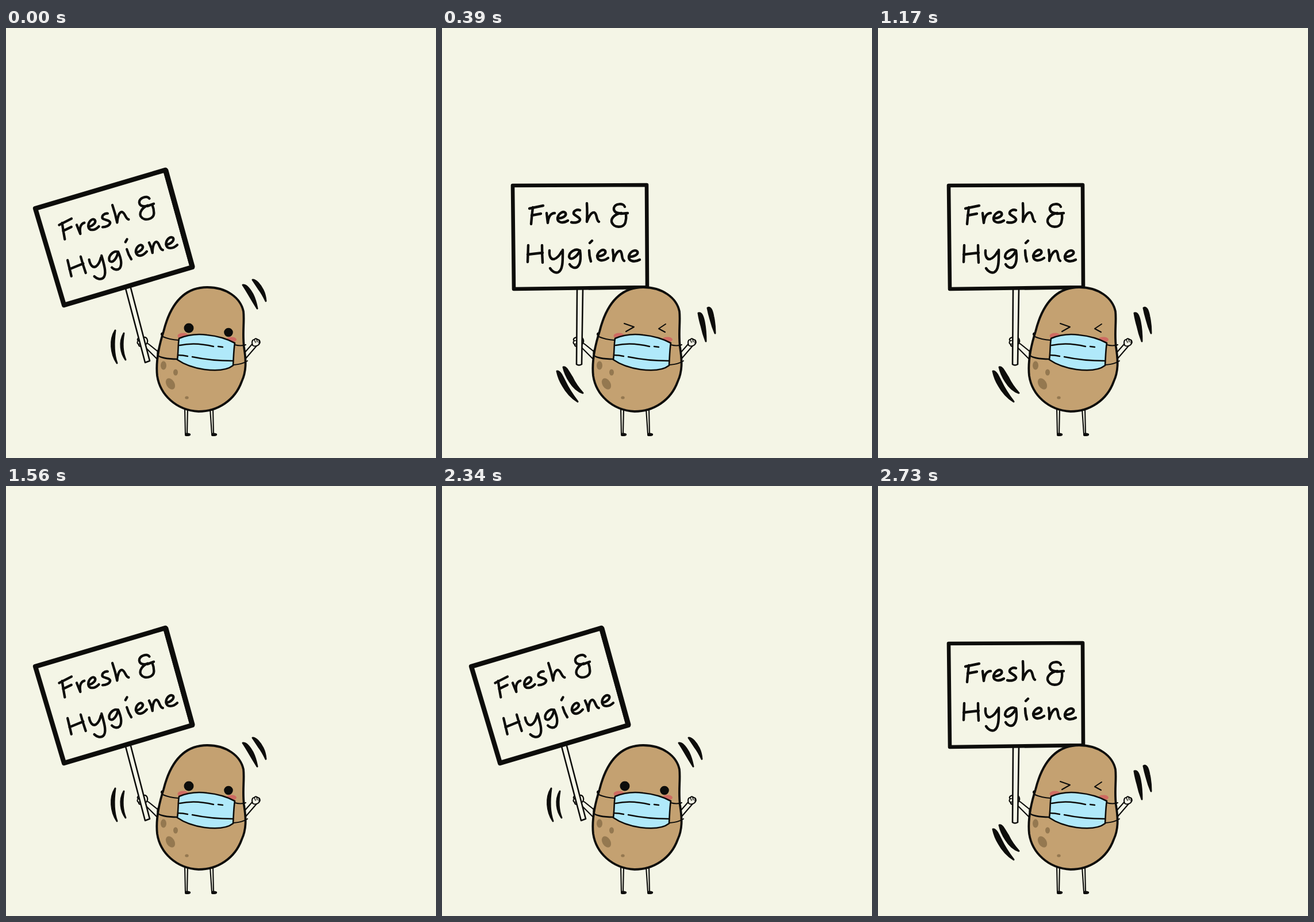
These frames come from a looping animation (748x748 px, 3120 ms). An HTML page:

```html
<!DOCTYPE html>
<html lang="en">
<head>
<meta charset="utf-8">
<title>Fresh &amp; Hygiene</title>
<style>
  html, body { margin: 0; width: 100%; height: 100%; overflow: hidden; background: #f4f5e6; }
  svg { display: block; width: 100%; height: 100%; }
  .line { fill: none; stroke: #0d0d0b; stroke-width: 2.1; stroke-linecap: round; stroke-linejoin: round; }
  .paper { fill: #f5f6e8; }
  .stick { stroke-width: 2.6; }
  .lettering { stroke-width: 4.4; }
  .marks { fill: #0d0d0b; stroke-width: 3; }
</style>
</head>
<body>
<svg viewBox="0 0 748 748" role="img" aria-label="A potato in a face mask waves a sign: Fresh &amp; Hygiene">
  <defs>
    <!-- Brush lettering, drawn upright around (242, 354.7) -->
    <g id="lettering" class="line lettering">
      <g id="fresh">
        <path d="M152 314L176 309M158 312Q156 328 155 341M156 326L172 323"/>
        <path d="M182 322Q183 331 184 339C185 329 189 322 196 322"/>
        <path d="M202 331C210 331 217 327 215 322C212 317 203 322 201 330C200 338 209 341 219 335"/>
        <path d="M240 317C235 315 228 318 229 323C231 327 241 329 240 334C238 339 230 339 225 338"/>
        <path d="M252 305Q253 321 252 337C255 328 260 320 265 321C270 323 268 335 273 337"/>
      </g>
      <path id="ampersand" d="M318 311C316 304 301 305 299 313C298 320 305 323 312 322C302 323 294 330 295 337C298 348 316 349 319 338Q321 331 320 323M311 323L323 322"/>
      <g id="hygiene">
        <path d="M150 378L149 407M149 394L175 391M174 378Q174 394 175 408"/>
        <path d="M187 387C186 398 190 403 195 402Q202 400 208 389M210 386C210 402 211 421 202 425C197 427 191 423 188 418"/>
        <path d="M239 387C233 383 221 389 221 398C224 406 235 398 240 387C242 400 241 411 235 416C230 419 224 415 222 411"/>
        <path d="M256 387Q256 397 259 406M257 374L261 370"/>
        <path d="M271 397C279 397 286 393 284 388C281 383 272 388 270 396C270 405 279 407 289 400"/>
        <path d="M297 386Q299 396 298 405C301 394 306 387 310 388C315 391 311 402 317 405"/>
        <path d="M326 398C334 398 342 394 340 389C336 384 327 389 325 397C324 406 335 408 344 403"/>
      </g>
    </g>
    <path id="foot" d="M-5 0C-5 -4 2 -3 5 -1C6 3 2 3 -2 3C-5 3 -5 2 -5 0Z" fill="#0d0d0b"/>
  </defs>
  <rect width="748" height="748" fill="#f4f5e6"/>

  <!-- Arms and fists -->
  <g class="line">
    <path class="paper" d="M247 549L267 565L263 576L243 556"/>
    <path class="paper" d="M234 538C228 539 228 543 230 544C227 547 229 550 231 550C230 554 235 555 238 553L245 549C248 544 245 537 240 538Z"/>
    <path d="M230 544L237 543M231 550L238 548" stroke-width="1.6"/>
    <path class="paper" d="M414 566L429 549L435 554L416 576"/>
    <path class="paper" d="M429 552C427 547 428 542 432 542C434 539 437 541 438 542C441 542 443 546 441 549C439 553 433 555 429 552Z"/>
    <path d="M432 542L434 547M436 541L437 546M440 543L440 548" stroke-width="1.5"/>
  </g>

  <g id="tilted">
    <path class="line paper stick" d="M208 453L242 582L250 579L217 452"/>
    <path class="line" d="M51 314L277 247L324 416L101 482Z" style="stroke-width:8.2"/>
    <path class="line" d="M278 248L324 415" style="stroke-width:9"/>
    <use href="#lettering" transform="translate(188.5 357.9) rotate(-15.3) scale(.985) translate(-242 -354.7)"/>
    <g class="line marks">
      <path d="M412 447C418 446 424 454 429 463Q434 473 437 488Q429 475 422 463Q416 453 412 447Z"/>
      <path d="M429 438C435 438 442 446 447 456Q451 464 452 475Q446 462 439 453Q433 444 429 438Z"/>
      <path d="M190 526C180 542 182 566 193 583Q185 561 190 526Z"/>
      <path d="M205 531C196 547 200 566 208 577Q200 558 205 531Z"/>
    </g>
  </g>

  <g id="upright">
    <path class="line paper stick" d="M235 455L234 585Q238 588 243 585L245 455"/>
    <path class="line" d="M123 274L356 273L357 451L125 454Z" style="stroke-width:6.6"/>
    <use href="#lettering"/>
    <g class="line marks">
      <path d="M446 496C451 494 454 501 456 511Q459 526 459 545Q454 532 451 518Q448 508 446 496Z"/>
      <path d="M462 487C467 484 470 491 472 502Q475 516 475 531Q470 519 467 507Q464 497 462 487Z"/>
      <path d="M200 597C205 596 209 605 214 615Q222 632 236 650Q220 640 210 622Q203 611 200 597Z"/>
      <path d="M211 590C216 588 220 598 226 607Q233 622 245 635Q232 631 222 615Q214 603 211 590Z"/>
    </g>
  </g>

  <!-- Legs -->
  <path class="line paper" d="M311 662L312 706M316 662L315 706M355 662L358 706M360 662L361 706"/>
  <use href="#foot" x="316" y="707"/>
  <use href="#foot" x="362" y="707"/>

  <path class="line" d="M350 451C383 451 408 469 413 493C415 510 411 530 414 555C418 580 418 598 410 615C398 648 368 667 335 667C296 665 268 638 263 605C260 578 267 550 274 528C283 492 302 451 350 451Z" style="fill:#c4a171;stroke-width:3.8"/>
  <g fill="#947850">
    <ellipse cx="274" cy="587" rx="5" ry="7.5"/>
    <ellipse cx="295" cy="599" rx="4" ry="5.5"/>
    <ellipse cx="286" cy="619" rx="7" ry="10.5" transform="rotate(-32 286 619)"/>
    <ellipse cx="314.5" cy="643" rx="3.2" ry="2.6"/>
  </g>
  <g fill="#cf6b62">
    <ellipse cx="308" cy="535.5" rx="9.5" ry="5"/>
    <ellipse cx="392" cy="542" rx="9" ry="4.5"/>
  </g>

  <!-- Mask with ear loops -->
  <g class="line">
    <path d="M300 543Q284 542 273 537C268 533 270 529 274 531"/>
    <path d="M298 576C281 576 264 573 264 568Q263 563 265 560" style="stroke-width:2.6"/>
    <path d="M398 551Q408 554 417 551M396 586Q411 585 420 579"/>
    <path d="M301 540C320 532 335 532 350 534C370 536 385 541 398 548C396 560 396 572 395 587C385 595 368 597 345 594C325 591 311 586 298 577C300 563 299 552 301 540Z" style="fill:#b0e9fa;stroke-width:2.6"/>
    <path d="M302 552C320 548 341 549 361 554M369 554L377 555M299 569Q308 569 316 571M324 572Q357 579 395 579" style="stroke-width:2.4"/>
  </g>

  <g id="openEyes" fill="#0d0d0b">
    <circle cx="318" cy="522" r="8.5"/>
    <circle cx="387" cy="529.5" r="7.8"/>
  </g>
  <path id="shutEyes" class="line" d="M317 514L334 520L320 528M389 515L377 523L388 529"/>
</svg>
<script>
  const POSE_MS = 390;
  const poses = [["tilted", "openEyes"], ["upright", "shutEyes"]]
    .map(ids => ids.map(id => document.getElementById(id)));
  const start = performance.now();

  function draw(now) {
    const current = Math.floor(Math.max(0, now - start) / POSE_MS) % 2;
    poses.forEach((parts, index) => {
      for (const part of parts) part.style.display = index === current ? "" : "none";
    });
    requestAnimationFrame(draw);
  }
  draw(start);
</script>
</body>
</html>
```
